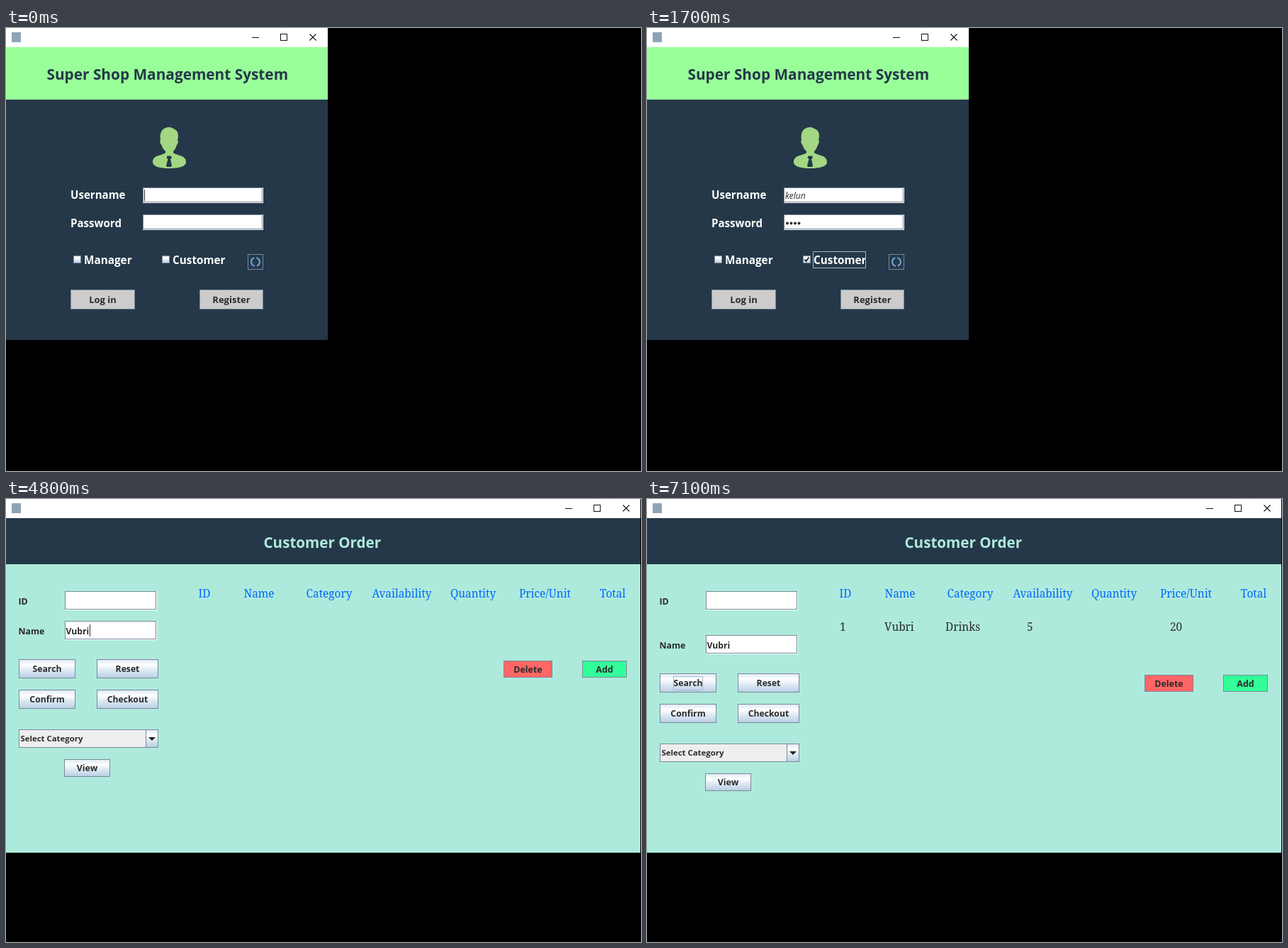
An HTML page that plays this animation: 896 px wide and 625 px high, repeating every 8 s.

```html
<!DOCTYPE html>
<html lang="en">
<head>
<meta charset="utf-8">
<title>Super Shop Management System</title>
<style>
  html, body { margin: 0; width: 100%; height: 100%; overflow: hidden; background: #000; }
  svg { display: block; width: 896px; height: 625px; }
  text { font-family: "Open Sans", "Noto Sans", sans-serif; font-weight: 700; white-space: pre; }
  .slab { font-family: "Noto Serif", serif; font-weight: 400; }
  .typed { font-weight: 400; font-style: italic; }
</style>
</head>
<body>
<svg id="stage" viewBox="0 0 896 625" xmlns="http://www.w3.org/2000/svg"></svg>
<script>
const NAVY = '#253849', MINT = '#aeeadc', EDGE = '#7a8a99', INK = '#2b2b2b', BLUE = '#0066ff';
const METAL = 'url(#metal)';

const rect = (x, y, w, h, fill) =>
  `<rect x="${x}" y="${y}" width="${w}" height="${h}" fill="${fill}"/>`;

const frame = (x, y, w, h, stroke = EDGE, fill = 'none') =>
  `<rect x="${x + .5}" y="${y + .5}" width="${w - 1}" height="${h - 1}" fill="${fill}" stroke="${stroke}"/>`;

const line = (d, stroke, width = 1) =>
  `<path d="${d}" fill="none" stroke="${stroke}" stroke-width="${width}"/>`;

const text = (x, y, s, size, fill = INK, anchor = 'start', cls = '') =>
  `<text x="${x}" y="${y}" font-size="${size}" fill="${fill}" text-anchor="${anchor}" class="${cls}">${s}</text>`;

const field = (x, y, w, h) => rect(x, y, w, h, '#fff') + frame(x, y, w - 1, h - 1);

const button = (x, y, w, h, s, fill = METAL, size = 12.2) =>
  frame(x, y, w, h, EDGE, fill) + text(x + w / 2, y + h / 2 + size * .4, s, size, INK, 'middle');

const group = (id, body, dy = 0) => `<g id="${id}" transform="translate(0 ${dy})">${body}</g>`;

// Title bar with the three window controls, placed from the right edge
function titleBar(width, right, height) {
  const y = height - 14;
  return rect(0, 0, width, height, '#fff') +
    rect(8, 6, 13, 14, '#8fa3b5') +
    line(`M${right - 91} ${y + .5}h10`, '#111') +
    frame(right - 51, y - 5, 10, 10, '#111') +
    line(`M${right - 9.5} ${y - 4.5}l9 9m0 -9l-9 9`, '#111', 1.1);
}

const person = `<path fill="#a3d783" d="M218 158C216 146 222 140 230 140C234 140 236 142 238 143
  C243 145 244 152 242 158C244 160 242 164 241 165C240 169 238 172 236 174L236 176
  C240 180 254 179 254 189C254 196 242 198 230.5 198C219 198 207 196 207 189
  C207 179 221 180 225 176L225 174C222 171 220 168 219.5 165C217 163 217 159 218 158Z"/>
  <path fill="${NAVY}" d="M227.5 180.5h5.5l1 2.500l-2 2l2 9l-1 2h-6l-1 -2l2.500 -9l-2 -2z"/>`;

const checkBox = (x, s) =>
  frame(x, 321, 11, 11, EDGE, METAL) + text(x + 15, 333, s, 15.3, '#fff');

const login =
  rect(0, 0, 454, 440, NAVY) + titleBar(454, 438, 27) + rect(0, 27, 454, 74, '#99ff99') +
  text(57.500, 73, 'Super Shop Management System', 20.8, NAVY) +
  person +
  text(91, 241, 'Username', 15.1, '#fff') + field(193, 225, 170, 22) +
  text(91, 281, 'Password', 15.1, '#fff') + field(193, 263, 170, 22) +
  checkBox(95, 'Manager') + checkBox(220, 'Customer') +
  frame(341, 319, 22, 22) +
  line('M350 324.300A6 6 0 0 0 348.500 334.800M354 335.700A6 6 0 0 0 355.500 325.200', '#6fa5dd', 2) +
  '<path fill="#6fa5dd" d="M346 334.500h5v2.500zM358 325.500h-5v-2.500z"/>' +
  button(91, 369, 91, 28, 'Log in', '#cccccc', 13) +
  button(273, 369, 90, 28, 'Register', '#cccccc', 13);

const credentials =
  text(195, 241, 'kelun', 12.2, INK, 'start', 'typed') +
  [0, 1, 2, 3].map(i => `<circle cx="${198 + i * 5.5}" cy="275.500" r="1.900" fill="${INK}"/>`).join('') +
  line('M222.500 326.500l2 2.500l4 -5.500', '#222', 1.8) +
  frame(234, 315, 75, 24, '#a3b8cc');

const columns = [[280, 'ID'], [357, 'Name'], [456, 'Category'], [558.5, 'Availability'],
  [659, 'Quantity'], [760.5, 'Price/Unit'], [856, 'Total']];
const cells = [[272, '1'], [335, 'Vubri'], [421, 'Drinks'], [536, '5'], [738, '20']];

const orderTop =
  text(363.500, 68, 'Customer Order', 20.6, MINT) +
  text(17.500, 148, 'ID', 12.3) + field(83, 129, 130, 27) +
  columns.map(([x, s]) => text(x, 138, s, 15.4, BLUE, 'middle', 'slab')).join('');

const orderForm =
  text(17.500, 190, 'Name', 12.3) + field(83, 171, 130, 27) +
  button(18, 225, 80, 27, 'Search') + button(128, 225, 87, 27, 'Reset') +
  button(18, 268, 80, 27, 'Confirm') + button(128, 268, 87, 27, 'Checkout') +
  frame(18, 324, 197, 26, EDGE, '#eeeeee') + frame(197, 324, 18, 26, EDGE, METAL) +
  '<path d="M201 335h10l-5 5z" fill="#222"/>' +
  text(20.500, 340.5, 'Select Category', 11.4) +
  button(82, 366, 65, 25, 'View', METAL, 12.4) +
  button(702, 227, 69, 24, 'Delete', '#ff6666', 12.4) +
  button(813, 227, 63, 24, 'Add', '#33ff99', 12.5);

const orderBase = (width, top) =>
  rect(0, 0, width, 499, MINT) + titleBar(width, 880, top) + rect(0, top, width, 65, NAVY);

document.getElementById('stage').innerHTML =
  `<defs><linearGradient id="metal" x2="0" y2="1">
    <stop stop-color="#dde8f3"/><stop offset=".3" stop-color="#fff"/>
    <stop offset=".6" stop-color="#dde8f3"/><stop offset="1" stop-color="#b8cfe5"/>
  </linearGradient></defs>` +
  group('login', login) +
  group('loginCaret', line('M195.500 228v16', '#333')) +
  group('credentials', credentials) +
  group('order', orderBase(896, 26)) +
  group('orderLow', orderBase(895, 27)) +
  group('top', orderTop) +
  group('form', orderForm +
    group('product', text(84.500, 190, 'Vubri', 12.2)) +
    group('nameCaret', line('M118.500 176v17', '#333')) +
    group('resetFocus', frame(154, 229, 35, 19, '#a3b8cc')) +
    group('searchFocus', frame(37, 229, 42, 20, '#a3b8cc'))) +
  group('row', cells.map(([x, s]) => text(x, 186, s, 15.4, INK, 'start', 'slab')).join(''));

const parts = [...document.querySelectorAll('g[id]')];
const byId = Object.fromEntries(parts.map(g => [g.id, g]));

// Start time, visible parts, offset of the order page, offset of its form
const steps = [
  [0, 'login loginCaret', 0, 0],
  [500, 'login credentials', 0, 0],
  [2500, 'order top form resetFocus', 0, 0],
  [4800, 'orderLow top form product nameCaret', 1, 1],
  [7100, 'orderLow top form product searchFocus row', 1, 21]
];
const LOOP = 8000;
let shown;

function draw() {
  const t = performance.now() % LOOP;
  const step = steps.findLast(s => s[0] <= t);
  if (step !== shown) {
    const [, names, topY, formY] = shown = step;
    const on = names.split(' ');
    for (const g of parts) g.style.display = on.includes(g.id) ? '' : 'none';
    byId.top.setAttribute('transform', `translate(0 ${topY})`);
    byId.form.setAttribute('transform', `translate(0 ${formY})`);
  }
  requestAnimationFrame(draw);
}
draw();
</script>
</body>
</html>
```
